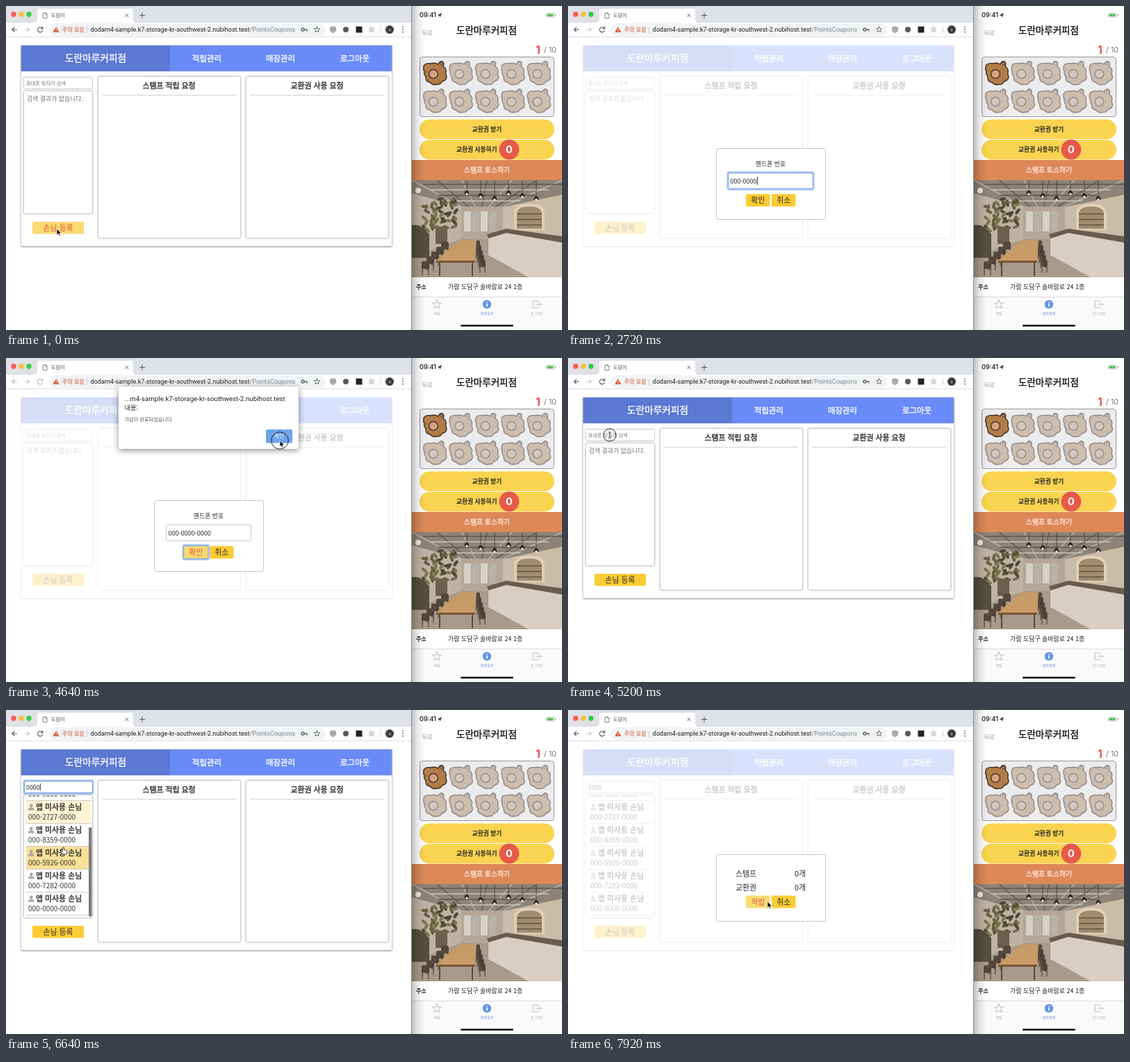
An HTML page for the animation above (8000 ms loop, 800 by 467 pixels).

```html
<!DOCTYPE html>
<html lang="ko">
<head>
<meta charset="utf-8">
<title>Stamp demo</title>
<style>
html, body { margin: 0; width: 100%; height: 100%; overflow: hidden; background: #fff; }
svg { display: block; width: 800px; height: 467px; }
text { font-family: "Noto Sans CJK KR", "Noto Sans CJK", "Noto Sans", sans-serif; white-space: pre; }
.ui { font-family: Roboto, sans-serif; }
.ios { font-family: Inter, sans-serif; }
.medium { stroke-width: .35px; }
.card { filter: drop-shadow(0 1px 1.5px rgba(0,0,0,.5)); }
.soft { filter: drop-shadow(0 .5px 1px rgba(0,0,0,.3)); }
.alert { filter: drop-shadow(0 2px 5px rgba(0,0,0,.45)); }
</style>
</head>
<body>
<svg id="stage" viewBox="0 0 800 467" xmlns="http://www.w3.org/2000/svg"></svg>
<script>
const LOOP = 8000;
const SHOP = '도란마루커피점';
const HOST = 'dodam4-sample.k7-storage-kr-southwest-2.nubihost.test';
const PHONE = '000-0000-0000';
const QUERY = '0000';
const YELLOW = '#fdcb35', PALE = '#fbdb70', RED = '#dd5148', INK = '#262626';

// ---- markup helpers ----
const rect = (x, y, w, h, fill, r = 0, extra = '') =>
  `<rect x="${x}" y="${y}" width="${w}" height="${h}" rx="${r}" fill="${fill}" ${extra}/>`;
const circ = (x, y, r, fill, extra = '') => `<circle cx="${x}" cy="${y}" r="${r}" fill="${fill}" ${extra}/>`;
const path = (d, fill, extra = '') => `<path d="${d}" fill="${fill}" ${extra}/>`;
const line = (d, color, w = 1, extra = '') =>
  path(d, 'none', `stroke="${color}" stroke-width="${w}" stroke-linecap="round" stroke-linejoin="round" ${extra}`);
const text = (x, y, s, size, fill = INK, extra = '') =>
  `<text x="${x}" y="${y}" font-size="${size}" fill="${fill}" ${extra}>${s}</text>`;
const mid = (x, y, s, size, fill = INK, extra = '') => text(x, y, s, size, fill, 'text-anchor="middle" ' + extra);
const medium = (x, y, s, size, fill) => mid(x, y, s, size, fill, `class="medium" stroke="${fill}"`);
const group = (id, body, extra = '') => `<g id="${id}" ${extra}>${body}</g>`;
const frame = (x, y, w, h, color = '#c8c8c8') => rect(x + .5, y + .5, w - 1, h - 1, '#fff', 2, `stroke="${color}"`);
const button = (id, x, y, w, h, label) =>
  group(id, rect(x, y, w, h, YELLOW, 2) + mid(x + w / 2, y + h / 2 + 4, label, 10.9));
const glow = (id, x, y, w, h) => group(id,
  rect(x - 1, y - 1, w + 2, h + 2, 'none', 3, 'stroke="#b3cbf4" stroke-width="1.5"') +
  rect(x + .5, y + .5, w - 1, h - 1, 'none', 2, 'stroke="#7ba3ea" stroke-width="1.3"'));

let seed = 7;
const rnd = () => (seed = (seed * 16807) % 2147483647) / 2147483647;

// ---- browser window ----
function chrome() {
  const lights = ['#fc5b57', '#fdbc40', '#34c84a'].map((c, i) => circ(11 + 11 * i, 12, 3.7, c)).join('');
  return rect(0, 0, 583, 24, '#dee1e6') + lights +
    path('M41 24Q45 24 45 19V8Q45 4 49 4H179Q183 4 183 8V19Q183 24 187 24Z', '#fff') +
    line('M53.5 10H57L59 12V17.5H53.5ZM57 10V12H59', '#666', .8) +
    text(65, 16, '도담이', 7, '#444') +
    line('M172 11.5L176 15.5M176 11.5L172 15.5', '#555', .9) +
    line('M196 10V17M192.5 13.5H199.5', '#555', 1) +
    rect(0, 24, 583, 20, '#fff') + rect(62, 25, 398, 18, '#f1f3f4', 9) +
    group('tools',
      line('M15.5 34H9M12 30.8L8.8 34L12 37.2', '#555', 1.1) +
      line('M52.3 32.2A3.7 3.7 0 1 0 52.7 35.2M52.8 30V32.8H50', '#555', 1.1)) +
    line('M27 34H33.5M30.5 30.8L33.7 34L30.5 37.2', '#c3c5c8', 1.1) +
    path('M72 30L76.4 37.8H67.6Z', '#d4522a') + rect(71.6, 32.6, .9, 2.8, '#fff') + rect(71.6, 36.1, .9, .9, '#fff') +
    text(81, 37, '주의 요함', 8, '#cf4b28') + rect(116, 29, 1, 10, '#c9ccd0') +
    text(121.5, 37.2, HOST + '<tspan fill="#80868b">/PointsCoupons</tspan>', 9.1, '#202124', 'class="ui"') +
    circ(427, 34, 2, 'none', 'stroke="#5f6368" stroke-width="1.4"') + line('M429 34H433V36', '#5f6368', 1.3) +
    star(447.5, 34, 4.3, '#5f6368') +
    path('M466 30.5L470.5 29L475 30.5V34Q475 37.5 470.5 39.3Q466 37.5 466 34Z', '#a7a9ac') +
    circ(489, 34, 4, '#55585c') + rect(503.5, 29.5, 9, 9, '#20252c') + circ(526, 34, 4, '#d5d6d8') +
    rect(539, 29, 1, 10, '#d5d7da') + circ(552, 34, 6, '#3d3d40') + mid(552, 36, 'a', 5.5, '#ddd', 'class="ui"') +
    [30.5, 34, 37.5].map(y => circ(571, y, .9, '#5f6368')).join('') +
    rect(0, 44, 583, 1, '#dcdde0');
}

function star(x, y, r, color, w = .9) {
  let d = '';
  for (let i = 0; i < 10; i++) {
    const a = Math.PI * (i / 5 - .5), q = i % 2 ? r * .45 : r;
    d += (i ? 'L' : 'M') + (x + q * Math.cos(a)).toFixed(1) + ' ' + (y + q * Math.sin(a)).toFixed(1);
  }
  return line(d + 'Z', color, w);
}

const column = (x, title) => `<g class="soft">${frame(x, 101, 206, 234, '#cfcfcf')}</g>` +
  medium(x + 102.5, 118.5, title, 10.9, INK) + rect(x + 7, 128, 192, 1, '#cfcfcf');

const GUESTS = [
  ['모루님', '000-0000-0000'], ['Sprout님', '000-9090-0000'],
  ['앱 미사용 손님', '000-2727-0000'], ['앱 미사용 손님', '000-8359-0000'],
  ['앱 미사용 손님', '000-5926-0000'], ['앱 미사용 손님', '000-7282-0000'],
  ['앱 미사용 손님', PHONE]
];

function guest([name, phone], i) {
  const y = 126 + 33 * i;
  const icon = i < 2 ? circ(36.3, y + 9.3, 4, '#6b4a33')
    : circ(36.3, y + 7, 2.4, '#a9a9a9') + path(`M32 ${y + 13.5}Q32 ${y + 9.5} 36.3 ${y + 9.5}T40.6 ${y + 13.5}Z`, '#a9a9a9');
  return rect(29, y, 93, 32, '#fad56b', 0, `id="row${i}"`) + icon +
    text(43, y + 13.2, name, 10.9, '#333', 'font-weight="600"') +
    text(32, y + 27, phone, 10, '#333') + rect(29, y + 32, 93, 1, '#cdcdcd');
}

function page() {
  return `<g class="card">${rect(22, 57, 533, 289, '#fff')}</g>` +
    `<g class="soft">${rect(22, 57, 533, 37, '#688bf8')}</g>` + rect(22, 57, 214, 37, '#5b78d3') +
    medium(129, 79.5, SHOP, 13.7, '#fff') +
    [['적립관리', 289], ['매장관리', 395], ['로그아웃', 502]].map(([s, x]) => medium(x, 79.5, s, 11.4, '#fff')).join('') +
    frame(25, 102, 100, 18) + glow('searchGlow', 26, 102, 99, 18) +
    text(29, 114, '휴대폰 뒷자리 검색', 7.2, '#777', 'id="searchHint"') +
    text(29, 114.5, '', 8.8, INK, 'id="query"') + rect(0, 106, .8, 10, '#111', 0, 'id="queryCaret"') +
    `<g class="soft">${frame(25, 122, 100, 178, '#cfcfcf')}</g>` +
    text(30, 136.5, '검색 결과가 없습니다.', 8.9, '#777', 'id="empty"') +
    group('list', group('rows', GUESTS.map(guest).join('')) + rect(119, 169, 4.5, 129, '#7d7d7d', 2.2, 'id="thumb"'), 'clip-path="url(#listClip)"') +
    button('join', 38, 311, 74, 17.5, '손님 등록') +
    column(132, '스탬프 적립 요청') + column(345, '교환권 사용 요청');
}

function dialogs() {
  const join = frame(213, 205, 158, 103) + mid(291.5, 231, '핸드폰 번호', 8.9) +
    frame(230, 240, 123, 24) + glow('phoneGlow', 230, 240, 123, 24) +
    text(233.5, 256, PHONE, 9.2, '#a9a9a9', 'id="phoneHint"') +
    text(233.5, 256, '', 9, INK, 'id="phone"') + rect(0, 246, .8, 12, '#111', 0, 'id="phoneCaret"') +
    button('ok', 256, 271, 34.5, 18, '확인') + button('no', 293, 271, 34.5, 18, '취소') +
    glow('okGlow', 255, 270, 36.5, 20);
  const stamp = frame(213, 208, 158, 97) +
    [['스탬프', 240], ['교환권', 260]].map(([s, y]) => text(241, y, s, 10.9) + text(342, y, '0개', 10.9, INK, 'text-anchor="end"')).join('') +
    button('save', 256, 267.5, 34.5, 18, '적립') + button('no2', 293, 267.5, 34.5, 18, '취소');
  const notice = `<g class="alert">${rect(162, 41, 259, 90, '#fff', 3)}</g>` +
    text(170.5, 62, '...' + HOST.slice(4), 9.75, '#202124', 'class="ui"') +
    text(170.5, 75, '내용:', 9.2, '#202124') + text(170.5, 91, '가입이 완료되었습니다.', 7.2, '#555') +
    rect(374, 103, 38, 19.5, '#6ea4ea', 2) + mid(393, 115.3, '확인', 7, '#fff');
  return group('joinBox', join) + group('stampBox', stamp) + group('notice', notice);
}

// ---- phone ----
const BADGE = 'M-16-8C-17-14-9-15-6-14Q0-16 5-13Q7-18 11-17Q14-15 12-10Q17-7 16-2Q15 1 17 5Q17 10 10 12Q8 17 2 16Q-2 18-7 13Q-14 12-13 5Q-16 1-15-3Q-17-5-16-8Z';

function stamps() {
  let s = '';
  for (let i = 0; i < 10; i++) {
    const on = i === 0, edge = on ? '#3b2a20' : '#8d8883';
    s += `<g transform="translate(${617 + 37.4 * (i % 5)} ${97 + 40 * Math.floor(i / 5)})">` +
      path(BADGE, on ? '#b27c48' : '#cdbdaf', `stroke="${edge}" stroke-width="1.4"`) +
      circ(10, -13.6, 1.8, on ? '#c99a70' : '#ded5cd', `stroke="${edge}" stroke-width=".8"`) +
      circ(-2, 1, 6.4, on ? '#d5a183' : '#d6c8be', `stroke="${edge}" stroke-width="1.3"`) + '</g>';
  }
  return s;
}

function cafe() {
  let s = rect(584, 251, 216, 140, '#a99c8e') +
    path('M584 251H800V280L715 291H655L584 275Z', '#8d8377') +
    path('M584 270L655 289V338L584 362Z', '#bfb2a2') +
    rect(655, 289, 60, 48, '#b5a695') + path('M715 290L800 272V345H715Z', '#cbbca9') +
    path('M584 362L655 336H715L800 352V391H584Z', '#a99a89');
  for (let i = 0; i < 7; i++) s += line(`M${584 + 36 * i} 251L${655 + 10 * i} 289`, i % 2 ? '#665d54' : '#b9afa3', 1.6);
  for (let i = 0; i < 4; i++) s += line(`M${600 + 11 * i} ${257 + 8 * i}H${800 - 20 * i}`, i % 2 ? '#cfc6ba' : '#5d544c', 1.4);
  s += circ(593, 266, 4, '#eee8df');
  for (let i = 0; i < 4; i++) s += rect(659 + 12 * i, 296, 10, 29, i % 2 ? '#b9b3a6' : '#d6d1c5');
  s += path('M731 323V299Q731 285 753 285T775 299V323Z', '#e0d0b9') + path('M735 321V300Q735 289 753 289T771 300V321Z', '#a18b70');
  for (let i = 0; i < 3; i++) s += rect(735, 299 + 8 * i, 36, 1.3, '#594b3d');
  for (let i = 0; i < 45; i++) {
    const x = (602 + 48 * rnd()).toFixed(1), y = (278 + 45 * rnd()).toFixed(1), turn = Math.round(rnd() * 180);
    s += `<ellipse cx="${x}" cy="${y}" rx="5" ry="2.2" fill="${['#4a4a34', '#66603f', '#7d7450'][i % 3]}" transform="rotate(${turn} ${x} ${y})"/>`;
  }
  s += path('M584 316Q598 313 609 329V363H584Z', '#54503c') + rect(618, 318, 17, 25, '#6b5f4e') +
    path('M694 330L720 322L800 337V391H752L694 359Z', '#d8cec2') + path('M692 329L720 321L800 332V341L720 327L694 335Z', '#6b5b4a');
  for (let i = 0; i < 5; i++) {
    const x = 598 + 7 * i, y = 368 - 7 * i, far = 681 - 2 * i;
    s += rect(x, y, 11, 11, '#54473c', 2) + line(`M${x + 1} ${y + 11}V${y + 20}M${x + 10} ${y + 11}V${y + 20}`, '#3c332c', 1) +
      rect(far, y - 2, 9, 10, '#54473c', 2) + line(`M${far + 1} ${y + 8}V${y + 16}M${far + 8} ${y + 8}V${y + 16}`, '#3c332c', 1);
  }
  s += path('M619 367L652 338H677L675 367Z', '#c89a66') + path('M619 367H675V370H619Z', '#7a5737') +
    line('M624 370V389M671 370V389', '#3c332c', 1.5);
  for (let i = 0; i < 6; i++) {
    const x = 663 + 20 * i, y = 266 + (i % 3) * 4;
    s += line(`M${x} 252V${y}`, '#302b28', .7) + path(`M${x - 4} ${y + 5}L${x - 2} ${y}H${x + 2}L${x + 4} ${y + 5}Z`, '#312d29') + circ(x, y + 5, 1.6, '#fff0c5');
  }
  return s;
}

function phone() {
  const bold = 'font-weight="600"';
  return rect(583, 0, 217, 467, '#fff') +
    text(595, 16.3, '09:41', 9.2, '#111', 'class="ios" font-weight="500"') + path('M620.5 13.5L627 10L624.6 16.6L623.7 13.8Z', '#222') +
    rect(777.5, 10.5, 12, 5.5, '#fff', 1.5, 'stroke="#aaa" stroke-width=".7"') + rect(778.5, 11.5, 9, 3.5, '#50c55b', .7) + rect(790.3, 12, 1, 2.5, '#aaa') +
    text(599, 42, '뒤로', 8.1, '#999') + medium(691.5, 40.3, SHOP, 13.5, '#111') +
    mid(765.5, 69, '1', 16, '#e5564a', 'class="ios" font-weight="700"') + text(774, 67.3, '/ 10', 10.8, '#777', 'class="ios"') +
    rect(595.5, 73.5, 193, 86, '#ececef', 4, 'stroke="#97979b"') + stamps() +
    rect(595, 163.5, 194, 28.5, '#fad350', 14.2) + mid(692, 181, '교환권 받기', 8.7, '#222', bold) +
    rect(595, 193, 194, 28.5, '#fad350', 14.2) + text(648, 210, '교환권 사용하기', 8.7, '#222', bold) +
    circ(724, 207, 14.4, '#e8594b') + mid(724, 212.2, '0', 14.5, '#fff', 'class="ios" font-weight="700"') +
    rect(584, 222, 216, 29, '#de8757') + medium(692, 240, '스탬프 토스하기', 9.9, '#fbeee5') +
    `<g clip-path="url(#photoClip)">${cafe()}</g>` +
    text(590, 408, '주소', 8.1, '#222', bold) + text(636, 408, '가람 도담구 솔바람로 24 1층', 8.95, '#222') +
    rect(584, 419, 216, 48, '#fafafa') + rect(584, 419, 216, .7, '#ccc') +
    star(620, 430.5, 6.7, '#b5b5b5') + mid(620, 445, '적립', 5, '#aaa') +
    circ(692, 430, 6.2, '#6196e8') + circ(692, 427.3, .9, '#fff') + rect(691.2, 429, 1.6, 4.5, '#fff') + mid(692, 445, '매장검색', 5, '#6196e8') +
    line('M766 426V425H758V435H766V434M762 430H770M767.5 427.5L770 430L767.5 432.5', '#b5b5b5', .9) + mid(764, 445, '로그아웃', 5, '#aaa') +
    rect(654, 459.5, 76, 2.4, '#111', 1.2) +
    rect(583, 0, 20, 467, 'url(#edge)') + rect(583, 0, 1, 467, '#8e8e8e');
}

const pointers =
  group('arrow', path('M0 0V9.2L2.2 7.2L3.8 10.6L5.3 9.9L3.8 6.7H6.7Z', '#111', 'stroke="#fff" stroke-width=".7"')) +
  group('beam', line('M-1.6-4.5Q0-4.5 0-3V3Q0 4.5-1.6 4.5M1.6-4.5Q0-4.5 0-3M0 3Q0 4.5 1.6 4.5', '#222', .8)) +
  group('hand', path('M-1.5 1V-4Q-1.5-5.2-.5-5.2T.5-4V-1.5L4-.8Q5-.5 4.8 1L4 5H-1L-4.3 1Q-4.5-.4-3.2-.2Z', '#fff', 'stroke="#222" stroke-width=".8"'));

const stage = document.getElementById('stage');
stage.innerHTML = `<defs><clipPath id="listClip">${rect(26, 123, 98, 176, '#fff')}</clipPath>
<clipPath id="photoClip">${rect(584, 251, 216, 140, '#fff')}</clipPath>
<linearGradient id="edge"><stop stop-opacity=".26"/><stop offset=".45" stop-opacity=".09"/><stop offset="1" stop-opacity="0"/></linearGradient></defs>` +
  rect(0, 0, 800, 467, '#fff') + page() + rect(0, 45, 583, 422, '#fff', 0, 'id="veil"') + chrome() + dialogs() + phone() +
  circ(0, 0, 9, 'none', 'id="ring" stroke="#222" stroke-width="1"') + group('cursor', pointers);

const el = {};
stage.querySelectorAll('[id]').forEach(n => el[n.id] = n);

// ---- motion ----
const clamp = v => Math.max(0, Math.min(1, v));
const ease = v => v * v * (3 - 2 * v);
const ramp = (t, from, len) => clamp((t - from) / len);
const pulse = (t, on, off, len = 120) => ramp(t, on, len) - ramp(t, off, len);
const within = (t, a, b) => t >= a && t < b;
const show = (id, v) => el[id].setAttribute('opacity', +v);

// time, x, y
const MOVES = [[0, 73, 321], [480, 73, 321], [1120, 260, 260], [3600, 260, 260], [3920, 273, 281],
  [4200, 273, 281], [4540, 394, 119], [4780, 394, 119], [5200, 60, 111], [5860, 62, 114],
  [6160, 92, 177], [6640, 83, 203], [6940, 76, 280], [7240, 76, 280], [7800, 287, 276], [8000, 287, 276]];
const CLICKS = [260, 1260, 4000, 4510, 5200, 6980];
const HOVERS = [[0, 5940, 6150], [1, 6150, 6320], [2, 6320, 6528], [4, 6528, 6760], [5, 6760, 6860], [6, 6860, 7080]];

function position(t) {
  const i = MOVES.findIndex((m, k) => k && t <= m[0]);
  const [t0, x0, y0] = MOVES[i - 1], [t1, x1, y1] = MOVES[i];
  const p = ease(ramp(t, t0, t1 - t0));
  return [x0 + (x1 - x0) * p, y0 + (y1 - y0) * p];
}

// The caret blinks until the first key is hit.
function typed(id, full, t, start, step, focused) {
  const n = Math.max(0, Math.min(full.length, Math.floor((t - start) / step) + 1));
  el[id].textContent = full.slice(0, n);
  const w = n ? el[id].getComputedTextLength() : 0;
  el[id + 'Caret'].setAttribute('x', +el[id].getAttribute('x') + w + .4);
  show(id + 'Caret', focused && (n > 0 || t % 1000 > 500));
  return n;
}

function tint(id, hot) {
  const [box, label] = el[id].children;
  box.setAttribute('fill', hot ? PALE : YELLOW);
  label.setAttribute('fill', hot ? RED : INK);
}

function draw(t) {
  const join = pulse(t, 360, 4740), stamp = pulse(t, 7120, 8200);
  show('veil', .75 * Math.max(join, stamp));
  show('joinBox', join);
  show('stampBox', stamp);
  const notice = within(t, 4160, 4700);
  show('notice', notice);
  show('tools', notice ? .4 : 1);

  const onPhone = within(t, 440, 4000);
  show('phoneGlow', onPhone);
  show('phoneHint', typed('phone', PHONE, t, 1800, 130, onPhone) === 0);
  show('okGlow', within(t, 4000, 4900));

  const onSearch = within(t, 5240, 7080);
  show('searchGlow', onSearch);
  const n = typed('query', QUERY, t, 5440, 120, onSearch);
  show('searchHint', n === 0);
  show('list', n === QUERY.length);
  show('empty', n < QUERY.length);

  const scroll = 61 * ease(ramp(t, 6260, 320));
  el.rows.setAttribute('transform', `translate(0 ${-scroll})`);
  el.thumb.setAttribute('y', 124 + 45 * scroll / 61);
  show('thumb', pulse(t, 6260, 6960));
  GUESTS.forEach((g, i) => show('row' + i, 0));
  HOVERS.forEach(([i, on, off]) => show('row' + i, pulse(t, on, off, 160)));

  tint('join', t < 400);
  tint('ok', within(t, 3820, 4900));
  tint('save', t >= 7740);

  const [x, y] = position(t);
  el.cursor.setAttribute('transform', `translate(${x} ${y})`);
  show('cursor', !within(t, 1760, 3600) && !within(t, 5400, 5880));
  const beam = within(t, 1000, 3720) || within(t, 5080, 5900), hand = within(t, 5900, 7160);
  show('beam', beam);
  show('hand', hand);
  show('arrow', !beam && !hand);

  const hit = CLICKS.find(c => within(t, c, c + 160));
  show('ring', hit !== undefined);
  if (hit !== undefined) {
    el.ring.setAttribute('cx', x);
    el.ring.setAttribute('cy', y);
    el.ring.setAttribute('r', 9 + 4 * (t - hit) / 160);
  }
}

const begin = performance.now();
function tick() {
  draw((performance.now() - begin) % LOOP);
  requestAnimationFrame(tick);
}
tick();
</script>
</body>
</html>
```
